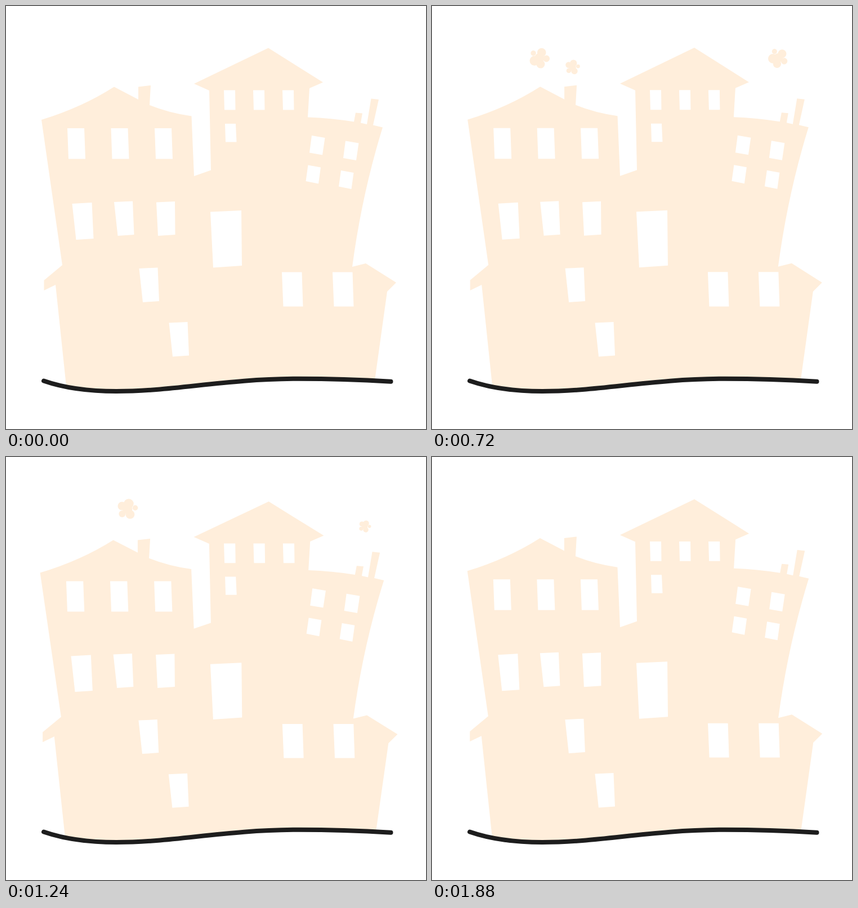
Write an HTML page that moves like this. It is 746 px wide and 751 px high and loops after 1.92 s.

```html
<!DOCTYPE html>
<html lang="en">
<head>
<meta charset="utf-8">
<title>Bouncing houses</title>
<style>
  html, body { margin: 0; width: 100%; height: 100%; overflow: hidden; background: #fff; }
  svg { display: block; width: 100vw; height: 100vh; }
</style>
</head>
<body>
<svg viewBox="0 0 746 751">
  <defs><g id="puff"><circle r="11"/></g></defs>
  <g id="town" fill="#ffeedb">
    <path id="houses" fill-rule="evenodd"/>
  </g>
  <path d="M67 665.5C100 677 140 684 196 684C300 684 387 661.8 520 661.8C575 661.8 630 663.6 683.5 666.7"
        fill="none" stroke="#1d1d1d" stroke-width="8" stroke-linecap="round"/>
</svg>
<script>
const LOOP = 1920, STEP = 40, SQUASH = 0.051;
const town = document.getElementById('town');

function addTo(parent, tag, attributes) {
  const node = document.createElementNS('http://www.w3.org/2000/svg', tag);
  for (const name in attributes) node.setAttribute(name, attributes[name]);
  return parent.appendChild(node);
}

const outline = 'M63 202Q135 180 192 143.5L235 166V143.5L257 141L255 176Q290 190 329.5 195.5' +
  'L334 302L364 291.5L361 150L334 138L466 74.5L563 135.5L539 146L536 197.5Q577 199 618 205.5' +
  'L621 189.5L633 190.5L630 207.5L641 210L648.5 164.5L662 166L652 211.5L669 215.5' +
  'Q632 335 615 463L639 457L693 491L677 507L655 665C610 662 560 662 520 662' +
  'C390 662 300 684 196 684Q150 684 107 675L88 495L67.5 505V487L100 460Z';

// Repeats a window shape along a straight row.
const row = (shape, x, y, count = 1, dx = 0, dy = 0) =>
  Array.from({ length: count }, (_, i) => `M${x + i * dx} ${y + i * dy}${shape}`).join('');

const leaning = 'l33-1.5 2.5 59.5-29 2z';
const windows = [
  row('h30l2 54.5h-30z', 109, 217, 3, 77.5),
  row('l35-2 3 64-31 2z', 117.5, 351),
  row(leaning, 192, 348),
  row('l33-1.5 .5 59-30.5 2z', 267, 348.5),
  row(leaning, 236.5, 466, 2, 53, 96.5),
  row('l55-2.5 1 98-51 3.5z', 363, 365.5),
  row('h35.5l2 61h-35z', 490, 472.5, 2, 90),
  row('h20l.5 35h-19.5z', 387, 149.5, 3, 52),
  row('h19l1.5 32.5h-19.5z', 389, 209),
  row('l23.5 4-4.5 30.5-23-4z', 543, 230, 2, 60, 9.5),
  row('l22.5 4-4 29-22.5-4.5z', 536.5, 282.5, 2, 58.5, 9.5)
];
document.getElementById('houses').setAttribute('d', outline + windows.join(''));

// Five lobes around the core; the smaller ones stick out further.
[11, 9.5, 7.5, 10, 6].forEach((r, i) => {
  const angle = (-77 - 73 * i) * Math.PI / 180, reach = 23.5 - r;
  addTo(document.getElementById('puff'), 'circle',
    { cx: reach * Math.cos(angle), cy: reach * Math.sin(angle), r });
});

// Each puff follows a quadratic curve through [x, y, scale], running on past both ends.
const GROW = 120;
const puffs = [
  { turn: 228, begin: 480, end: 920, gone: 1000,
    curve: [[234, 103.5, .57], [198, 93, .77], [148, 85, .96]] },
  { turn: 250, begin: 480, end: 920, gone: 1000,
    curve: [[650, 121.3, .57], [619.5, 95.4, .75], [583, 68.3, .91]] },
  { turn: 0, begin: 720, end: 1520, gone: 1760,
    curve: [[249.5, 109, .57], [242, 86, .66], [180.5, 84, 1]] },
  { turn: 10, begin: 920, end: 1520, gone: 1760,
    curve: [[658, 140.6, .27], [653, 130, .3], [587, 83, .92]] }
];
for (const puff of puffs) puff.node = addTo(town, 'use', { href: '#puff' });

const clamp = v => Math.max(0, Math.min(1, v));
const easeInOut = p => (1 - Math.cos(Math.PI * p)) / 2;

// Time, direction: 1 is squashed, -1 is stretched.
const bounce = [[0, 0], [430, 1], [1005, -1], [1040, -1], [1405, 1], [LOOP, 0]];

function squashAt(time) {
  const next = bounce.findIndex(([at]) => at > time);
  const [t0, a] = bounce[next - 1], [t1, b] = bounce[next];
  return SQUASH * (a + (b - a) * easeInOut((time - t0) / (t1 - t0)));
}

function drawPuff({ node, turn, begin, end, gone, curve: [from, bend, to] }, time) {
  const p = (time - begin) / (end - begin);
  const [x, y, scale] = from.map((v, i) =>
    v * (1 - p) ** 2 + 2 * bend[i] * p * (1 - p) + to[i] * p * p);
  const size = time < gone ? scale * clamp((time - begin) / GROW + 1) : 0;
  node.setAttribute('visibility', size > 0 ? 'visible' : 'hidden');
  node.setAttribute('transform', `translate(${x} ${y}) rotate(${turn}) scale(${size})`);
}

function draw(time) {
  const s = squashAt(time);
  town.setAttribute('transform', `translate(378 669) scale(${1 + s} ${1 - s}) translate(-378 -669)`);
  for (const puff of puffs) drawPuff(puff, time);
}

const start = performance.now();
function tick() {
  const time = Math.max(0, performance.now() - start) % LOOP;
  draw(Math.floor(time / STEP) * STEP);
  requestAnimationFrame(tick);
}
tick();
</script>
</body>
</html>
```
